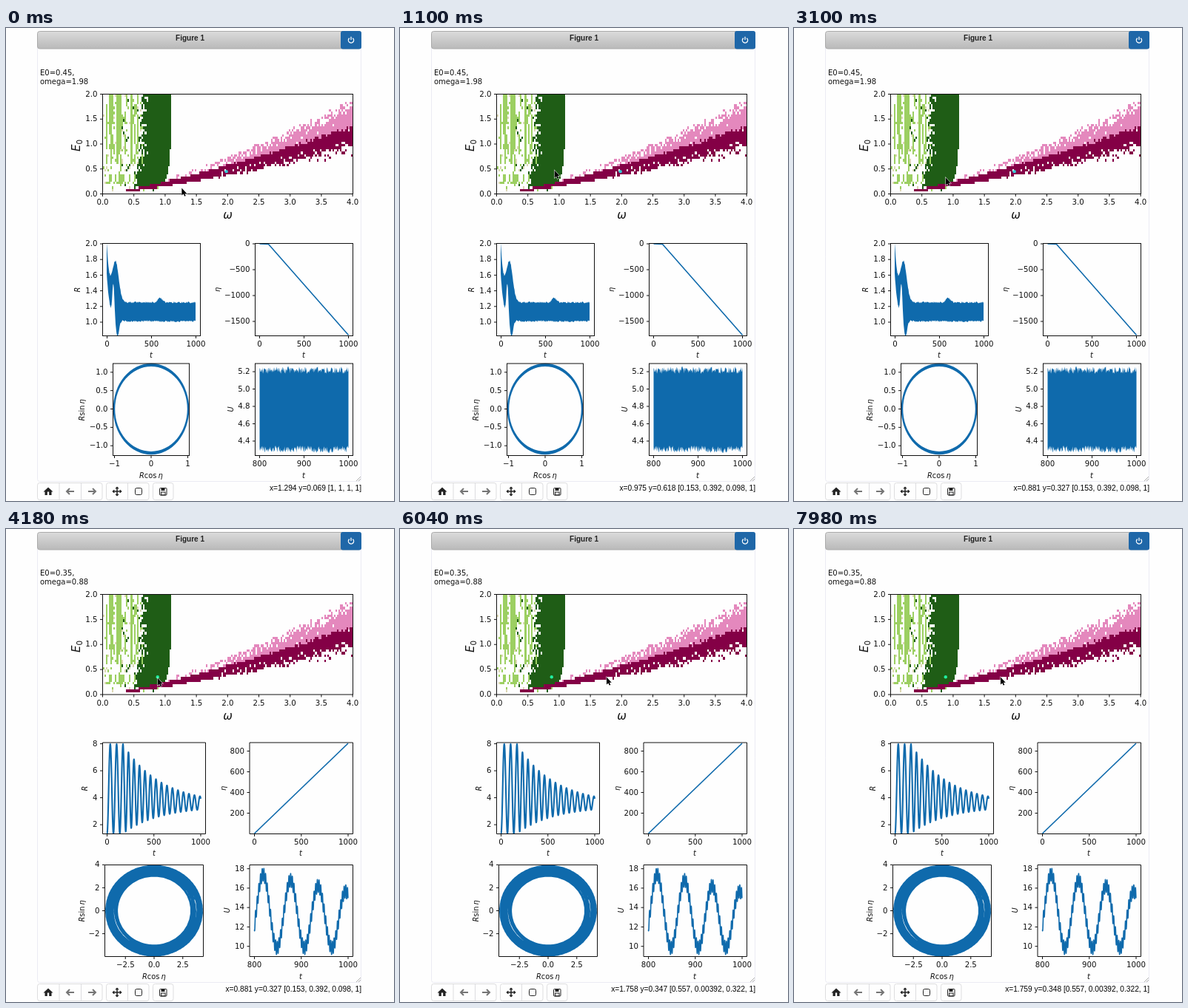
Write an HTML page with a canvas that moves like this. It is 524 by 640 pixels and loops after 8000 ms.

```html
<!DOCTYPE html>
<html lang="en">
<head>
<meta charset="utf-8">
<title>Figure 1</title>
<style>
html, body { margin: 0; width: 100%; height: 100%; overflow: hidden; background: #fefefe; }
canvas { display: block; }
</style>
</head>
<body>
<canvas id="stage" width="524" height="640"></canvas>
<script>
const ctx = document.getElementById('stage').getContext('2d');
const LOOP = 8000, SWITCH = 3700, LAG = 200;
const PAPER = '#fefefe', INK = '#111', BLUE = '#0f6aac', TAU = Math.PI * 2;
const SANS = '"DejaVu Sans", sans-serif', UI = '"Liberation Sans", Arial, sans-serif';
const ITALIC = 'italic 9.8px ' + SANS, UPRIGHT = '9.8px ' + SANS;

const clamp = v => Math.max(0, Math.min(1, v));
const mix = (a, b, u) => a + (b - a) * u;
const smooth = u => u * u * (3 - 2 * u);
const bell = (x, centre, width) => Math.exp(-(((x - centre) / width) ** 2));
const rnd = (a, b = 0) => {
  const v = Math.sin(a * 12.9898 + b * 78.233 + 3.7) * 43758.5453;
  return v - Math.floor(v);
};
const series = (from, to, step, f) => {
  const points = [];
  for (let v = from; v <= to + 1e-6; v += step) points.push(f(v));
  return points;
};

// ---- drawing helpers ----
function text(str, x, y, font, align = 'left', color = INK) {
  ctx.font = font;
  ctx.textAlign = align;
  ctx.fillStyle = color;
  ctx.fillText(str, x, y);
}
function placed(x, y, angle, draw) {
  ctx.save();
  ctx.translate(x, y);
  ctx.rotate(angle);
  draw();
  ctx.restore();
}
const turned = (x, y, draw) => placed(x, y, -Math.PI / 2, draw);
function trace(points) {
  ctx.beginPath();
  points.forEach(p => ctx.lineTo(...p));
}
function line(points, color = INK, width = 1) {
  trace(points);
  ctx.strokeStyle = color;
  ctx.lineWidth = width;
  ctx.stroke();
}
function fill(points, color) {
  trace(points);
  ctx.fillStyle = color;
  ctx.fill();
}
function box(x, y, w, h, r, paint, border) {
  ctx.beginPath();
  ctx.roundRect(x, y, w, h, r);
  if (paint) { ctx.fillStyle = paint; ctx.fill(); }
  if (border) { ctx.strokeStyle = border; ctx.lineWidth = 1; ctx.stroke(); }
}

// ---- stability map ----
const KINDS = {
  white: [PAPER, '1, 1, 1, 1'],
  green: ['#1f5d16', '0.153, 0.392, 0.098, 1'],
  light: ['#9ccf62', '0.722, 0.882, 0.525, 1'],
  tan: ['#dcd8b4', '0.902, 0.961, 0.816, 1'],
  pink: ['#e488bd', '0.871, 0.467, 0.682, 1'],
  red: ['#840046', '0.557, 0.00392, 0.322, 1']
};
const STEP_W = .025, STEP_E = .05;

function kindAt(i, j) {
  const w = (i + .5) * STEP_W, e = (j + .5) * STEP_E;
  const n = rnd(i, j), m = rnd(i + 211, j);
  if (w > .3) {
    const low = .15 * w ** 1.36, high = .25 * w ** 1.21, top = .3 * w ** 1.31;
    const ragged = Math.max(0, w - 1.4) * .09;
    if (e > low - n ** 3 * ragged && e < high + (m - .5) * ragged * .4)
      return w > 1.9 && e < low + .1 && m < .2 ? 'white' : 'red';
    const density = w < 1.95 ? .4 : e > top - .16 ? .72 : .96;
    if (w > 1.05 && e >= high - .03 && e < top + (n - .6) * ragged && m < density) return 'pink';
  }
  if (e < STEP_E || w > 1.1 - .27 * Math.exp(-3.5 * e)) return 'white';
  // Green thins out to the left in short vertical dashes.
  const spread = Math.max(0, .9 - e) * .2;
  const dash = mix(rnd(i + 57, Math.floor(j / 3)), n, .45);
  if (e > .13 && dash < clamp((w + spread - .5) / .26) ** 1.5) return 'green';
  const column = Math.floor(i + Math.max(0, .6 - e) * 6);
  const strength = rnd(column + 30) ** 2 * (e > .9 ? 1 : .5);
  if (e > .2 && w > .04 && rnd(column + 91, Math.floor(j / 4)) < strength) return 'light';
  if (n < .06) return 'light';
  if (n < .11) return 'tan';
  return w > .3 && n > .95 ? 'green' : 'white';
}

const map = document.createElement('canvas');
map.width = 4 / STEP_W;
map.height = 2 / STEP_E;
const mapCtx = map.getContext('2d');
for (let i = 0; i < map.width; i++) for (let j = 0; j < map.height; j++) {
  mapCtx.fillStyle = KINDS[kindAt(i, j)][0];
  mapCtx.fillRect(i, map.height - 1 - j, 1, 1);
}

// ---- axes ----
const axis = (zero, scale, from, to, step, decimals = 0) => ({ zero, scale, from, to, step, decimals });

function axes(l, t, r, b, xAxis, yAxis) {
  const font = '10.2px ' + SANS;
  const ticks = (a, draw) => series(a.from, a.to, a.step, v =>
    draw(a.zero + v * a.scale, v.toFixed(a.decimals).replace('-', '\u2212')));
  ctx.strokeStyle = INK;
  ctx.lineWidth = 1;
  ctx.strokeRect(l, t, r - l, b - t);
  ctx.textBaseline = 'middle';
  ticks(xAxis, (x, label) => {
    line([[x, b], [x, b + 3.5]]);
    text(label, x, b + 12, font, 'center');
  });
  ticks(yAxis, (y, label) => {
    line([[l - 3.5, y], [l, y]]);
    text(label, l - 7, y + .5, font, 'right');
  });
  ctx.textBaseline = 'alphabetic';
}
const xName = (str, x, y) => text(str, x, y + 3.5, ITALIC, 'center');
const yName = (str, x, y) => turned(x, y, () => xName(str, 0, 0));
function polarNames(cx) {
  const name = fn => {
    text('R', -16, 3.5, ITALIC);
    text(fn, -9.2, 3.5, UPRIGHT);
    text('\u03b7', -7 + ctx.measureText(fn).width, 3.5, ITALIC);
  };
  placed(cx, 605, 0, () => name('cos'));
  turned(102, 515.5, () => name('sin'));
}

// ---- first parameter set: locked, fast rotation ----
const upperR = s => 372.5 - 82 * Math.exp(-s / 4) - 52 * bell(s, 12, 6) - 6 * bell(s, 72, 4);
const lowerR = s => 395.5 - 65 * Math.exp(-s / 4) - 45 * bell(s, 9, 2) + 22 * bell(s, 14.5, 3);

function ragged(x0, upper, lower, roughness, top, bottom) {
  const edge = (f, sign) => series(0, 120, .6, s =>
    [x0 + s, Math.max(top, Math.min(bottom, f(s) + sign * roughness * rnd(s, sign)))]);
  fill([...edge(upper, -1), ...edge(lower, 1).reverse()], BLUE);
}

function drawLocked() {
  const time = x => axis(x, .12, 0, 1000, 500);
  ragged(136, upperR, lowerR, 2.5, 291, 416);
  axes(130.5, 291.5, 262.5, 416.5, time(136.5), axis(504, -106, 1, 2, .2, 1));
  yName('R', 96, 354);
  xName('t', 196, 442);

  line([[342.5, 292], [354.5, 292.5], [462.5, 415.5]], BLUE, 1.6);
  axes(336.5, 291.5, 468.5, 416.5, time(342.5), axis(292, -.07, -1500, 0, 500));
  yName('\u03b7', 285, 354);
  xName('t', 402, 442);

  ctx.beginPath();
  ctx.ellipse(196, 515.5, 51.3, 61.7, 0, 0, TAU);
  ctx.ellipse(196, 515.5, 48.8, 57.5, 0, 0, TAU);
  ctx.fillStyle = BLUE;
  ctx.fill('evenodd');
  axes(144.5, 454, 247.5, 578.5, axis(196, 49.5, -1, 1, 1), axis(515.5, -49.7, -1, 1, .5, 1));
  polarNames(196);

  ragged(342.5, () => 468, () => 565, 10, 454, 578);
  axes(336.5, 454, 468.5, 578.5, axis(-137.5, .6, 800, 1000, 100), axis(1075.5, -117.4, 4.4, 5.2, .2, 1));
  yName('U', 303, 516);
  xName('t', 402, 605);
}

// ---- second parameter set: slow decaying beats ----
const SPIN = .88;
const swing = t => (1 - Math.cos(TAU * (t < 170 ? t / 68 : 2.5 + (t - 170) / 58.7))) / 2;
const decay = t => Math.exp(-Math.max(0, t - 170) / 400);
const beatR = t => mix(375 + 37 * decay(t), 372 - 81 * decay(t), swing(t));
const beatU = t => mix(567, 465 + 26 * (t - 800) / 200, swing(t - 3)) + 9 * Math.sin(2 * SPIN * t);
function orbit(t) {
  const r = mix(50, 65, swing(t));
  return [200 + r * Math.cos(SPIN * t), 516.5 - .94 * r * Math.sin(SPIN * t)];
}

function drawBeats() {
  const scale = .1265, time = axis(136.5, scale, 0, 1000, 500);
  ctx.lineJoin = 'round';
  line(series(0, 1000, 1, t => [136.5 + t * scale, beatR(t)]), BLUE, 2.1);
  axes(130.5, 289, 269.5, 412.5, time, axis(436.6, -18.25, 2, 8, 2));
  yName('R', 106, 351);
  xName('t', 200, 438);

  line([[335.5, 412], [462, 290]], BLUE, 1.7);
  axes(329, 289, 468.5, 412.5, { ...time, zero: 335.5 }, axis(412.5, -.14, 200, 800, 200));
  yName('\u03b7', 293, 351);
  xName('t', 398, 438);

  line(series(800, 1000, .2, orbit), BLUE, 2);
  axes(133.5, 454.5, 266.5, 578.5, axis(200, 15.5, -2.5, 2.5, 2.5, 1), axis(516.5, -15.55, -2, 4, 2));
  polarNames(200);

  line(series(800, 1000, .3, t => [335.5 + (t - 800) * .6325, beatU(t)]), BLUE, 1.6);
  axes(329, 454.5, 468.5, 578.5, axis(-170.5, .6325, 800, 1000, 100), axis(696, -13.13, 10, 18, 2));
  yName('U', 298, 516);
  xName('t', 398, 605);
  ctx.lineJoin = 'miter';
}

// ---- window chrome ----
function arrow(x, y, angle, length, color, width, head) {
  placed(x, y, angle, () => {
    line([[0, 0], [length, 0]], color, width);
    line([[length - head, -head], [length, 0], [length - head, head]], color, width);
  });
}
function drawChrome() {
  const rule = '#dddddf', icon = '#222', muted = '#757575';
  box(42.5, 5.5, 437, 608, 3, null, '#ebebf3');
  const grey = ctx.createLinearGradient(0, 4, 0, 28);
  grey.addColorStop(0, '#dcdcdc');
  grey.addColorStop(1, '#b9b9b9');
  box(42.5, 4.5, 437, 23.5, 3, grey, '#aaa');
  text('Figure 1', 248.5, 17, 'bold 10px ' + UI, 'center', icon);

  box(452, 4, 28, 24.5, 3, '#1f67a8');
  ctx.beginPath();
  ctx.arc(466, 16.5, 3.6, -.9, Math.PI + .9);
  ctx.strokeStyle = '#fff';
  ctx.lineWidth = 1.3;
  ctx.stroke();
  line([[466, 11.8], [466, 16]], '#fff', 1.3);
  for (const d of [3, 6]) line([[479 - d, 613], [479, 613 - d]], '#999', .8);

  box(42.5, 615.5, 87.5, 23, 3, null, rule);
  box(135.5, 615.5, 57.5, 23, 3, null, rule);
  box(198.5, 615.5, 27.5, 23, 3, null, rule);
  for (const x of [72, 101.5, 164.5]) line([[x, 616], [x, 638]], rule);

  fill([[50.5, 627.5], [57, 621.5], [63.5, 627.5]], icon);
  ctx.fillRect(52.5, 627, 3.3, 5);
  ctx.fillRect(58.2, 627, 3.3, 5);
  arrow(92, 627, Math.PI, 10, muted, 2, 4);
  arrow(111, 627, 0, 10, muted, 2, 4);
  for (let k = 0; k < 4; k++) arrow(150, 627, k * TAU / 4, 5.5, icon, 1.5, 1.8);
  box(174.5, 622.5, 9, 9, 2, null, icon);
  box(207.5, 622.5, 9.5, 9.5, 1, null, icon);
  ctx.strokeRect(209.5, 628, 5.5, 4);
  ctx.fillStyle = icon;
  ctx.fillRect(209.5, 623, 5, 3);
}

// ---- pointer: rests at { t, w, e }, eased in between ----
const STOPS = [
  { t: -200, w: 1.294, e: .069 }, { t: 900, w: .975, e: .618 }, { t: 1300, w: .881, e: .327 },
  { t: 4500, w: .881, e: .327 }, { t: 5240, w: 1.303, e: .154 }, { t: 5860, w: 1.759, e: .348 }
];
const POINTER = new Path2D('M0 0V10L2.3 8L3.8 11.2L5.4 10.5L3.9 7.4H6.8Z');

function pointerAt(t) {
  const next = STOPS.find(s => s.t > t) || STOPS[STOPS.length - 1];
  const last = STOPS[STOPS.indexOf(next) - 1];
  const u = smooth(clamp((t - last.t) / (next.t - last.t)));
  return { w: mix(last.w, next.w, u), e: mix(last.e, next.e, u) };
}

function drawMap(top, bottom, late) {
  const left = 130.5, perW = 84.4, perE = (bottom - top) / 2;
  const px = w => left + w * perW, py = e => bottom - e * perE;
  const chosen = late ? { w: .88, e: .35 } : { w: 1.98, e: .45 };

  text(`E0=${chosen.e.toFixed(2)},`, 46, late ? 63 : 64, '10px ' + SANS);
  text(`omega=${chosen.w.toFixed(2)}`, 46, late ? 75 : 76, '10px ' + SANS);
  ctx.imageSmoothingEnabled = false;
  ctx.drawImage(map, left, top, 4 * perW, bottom - top);
  axes(left, top, 468.5, bottom, axis(left, perW, 0, 4, .5, 1), axis(bottom, -perE, 0, 2, .5, 1));
  text('\u03c9', 299.5, 257.5, 'italic 15px ' + SANS, 'center');
  turned(100, 157, () => {
    text('E', -10, 0, 'italic 15px ' + SANS);
    text('0', -.5, 2.5, '10.4px ' + SANS);
  });
  ctx.beginPath();
  ctx.arc(px(chosen.w), py(chosen.e), 2.2, 0, TAU);
  ctx.fillStyle = late ? '#20efa0' : '#35c9d6';
  ctx.fill();
  return { px, py };
}

function drawPointer(x, y) {
  placed(x, y, 0, () => {
    ctx.strokeStyle = 'rgba(255,255,255,.8)';
    ctx.lineWidth = 1.2;
    ctx.stroke(POINTER);
    ctx.fillStyle = '#000';
    ctx.fill(POINTER);
  });
}

function render(t) {
  const late = t >= SWITCH;
  ctx.fillStyle = PAPER;
  ctx.fillRect(0, 0, 524, 640);
  drawChrome();
  const { px, py } = drawMap(late ? 88.5 : 89.5, late ? 224 : 224.5, late);
  (late ? drawBeats : drawLocked)();

  const now = pointerAt(t), read = pointerAt(t - LAG);
  drawPointer(px(now.w), py(now.e));
  const rgba = KINDS[kindAt(Math.floor(read.w / STEP_W), Math.floor(read.e / STEP_E))][1];
  text(`x=${read.w.toFixed(3)} y=${read.e.toFixed(3)} [${rgba}]`, 480, 626, '10.2px ' + UI, 'right', '#000');
}

const start = performance.now();
function tick() {
  render((performance.now() - start) % LOOP);
  requestAnimationFrame(tick);
}
tick();
</script>
</body>
</html>
```
